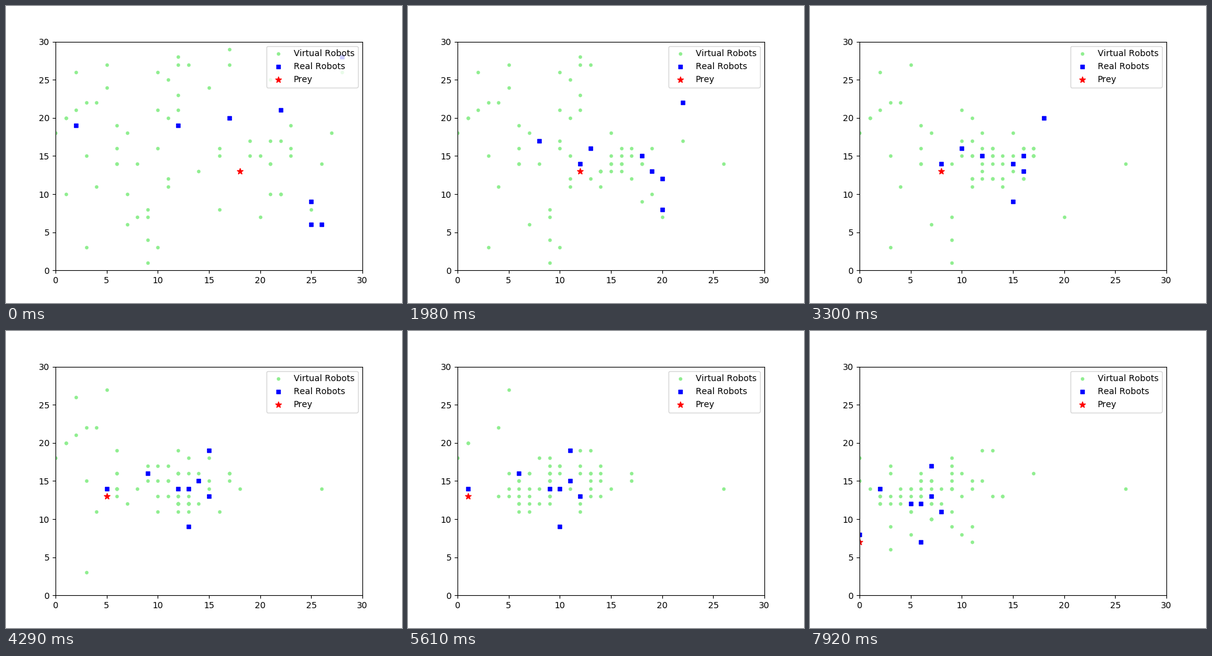
Write a matplotlib script that moves like this. It is 640 px wide and 480 px high and loops after 8000 ms.

```python
import random

import matplotlib.pyplot as plt
import numpy as np
from matplotlib.animation import FuncAnimation

LOOP, TICK, STEP = 8000, 40, 330
STEPS = 25
SPEED = 1.05

# Starting cells of the virtual robots: column -> rows.
LAYOUT = {
    0: [18], 1: [10, 20, 20], 2: [21, 26], 3: [3, 15, 22], 4: [11, 22],
    5: [24, 27], 6: [14, 14, 16, 19], 7: [6, 10, 18], 8: [7, 14],
    9: [1, 4, 7, 8], 10: [3, 16, 21, 26], 11: [11, 12, 20, 25],
    12: [21, 23, 27, 28], 13: [27], 14: [13], 15: [24], 16: [8, 15, 16],
    17: [27, 29], 19: [15, 17], 20: [7, 15], 21: [10, 14, 14, 17, 25],
    22: [10, 10, 17], 23: [15, 16, 19], 25: [8], 26: [14], 27: [18], 28: [26],
}

# Real robots: starting cell and place kept relative to the swarm centre.
ROBOTS = [
    ((2, 19), (0, 0)), ((17, 20), (-3, 2)), ((22, 21), (2, 1)),
    ((28, 28), (2, 5)), ((25, 9), (1, 0)), ((25, 6), (3, -1)),
    ((26, 6), (1, -5)),
]
CHASER = (12, 19)


def prey_at(step):
    """One cell left per step, then down along the wall."""
    return np.array([max(18 - step, 0), 13 - max(step - 18, 0)])


def centre_at(step):
    return np.array([19.7 - 0.62 * step, 14 - 0.6 * max(step - 20, 0)])


def pursue(start, goal):
    """Head for the moving goal, at most SPEED cells per step."""
    spot = np.array(start, float)
    path = [spot]
    for step in range(1, STEPS):
        gap = goal(step) - spot
        spot = spot + gap * min(1, SPEED / max(abs(gap).max(), SPEED))
        path.append(spot)
    return np.round(path)


def swarm_path(seed=5):
    """Cells wait until the prey has passed, then hop around the centre."""
    rng = random.Random(seed)
    spots = [(x, y) for x, ys in LAYOUT.items() for y in ys]
    pace = [rng.uniform(0.1, 0.6) for _ in spots]
    path = [list(spots), list(spots)]
    for step in range(2, STEPS):
        cx, cy = centre_at(step)
        for i, (x, _) in enumerate(spots):
            chance = pace[i] if x > prey_at(step)[0] else 0.02
            if rng.random() < chance:
                spots[i] = (max(round(rng.gauss(cx, 2.6)), 0),
                            round(rng.gauss(cy, 2)))
        path.append(list(spots))
    return path


swarm = swarm_path()
robots = [pursue(start, lambda step, slot=slot: centre_at(step) + slot)
          for start, slot in ROBOTS]
robots.append(pursue(CHASER, lambda step: prey_at(step) + (0, 1)))
robots = np.array(robots)

plt.rcParams["text.kerning_factor"] = 6
fig, ax = plt.subplots(figsize=(6.4, 4.8), dpi=100)
ax.set_xlim(0, 30)
ax.set_ylim(0, 30)
virtual = ax.scatter([], [], s=10, c="lightgreen", label="Virtual Robots")
real = ax.scatter([], [], s=20, c="blue", marker="s", label="Real Robots")
prey = ax.scatter([], [], s=50, c="red", marker="*", label="Prey")
ax.legend(loc="upper right")


def draw(i):
    step = min((i * TICK + TICK - 1) // STEP, STEPS - 1)
    virtual.set_offsets(swarm[step])
    real.set_offsets(robots[:, step])
    prey.set_offsets([prey_at(step)])
    return virtual, real, prey


anim = FuncAnimation(fig, draw, frames=LOOP // TICK, interval=TICK,
                     repeat=True, repeat_delay=0)
plt.show()
```
